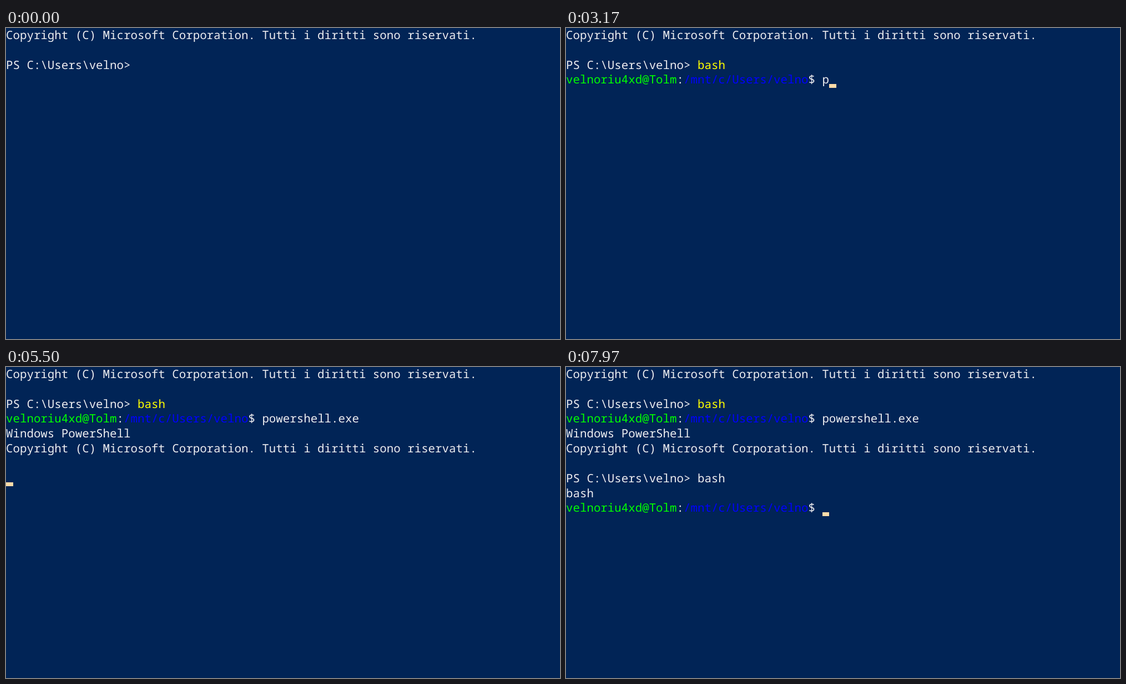
Animation, 998 px wide and 561 px high, one loop 8 s. Source, as an HTML page:

```html
<!DOCTYPE html>
<html lang="it">
<head>
<meta charset="utf-8">
<title>Terminal</title>
<style>
  html, body { margin: 0; width: 100%; height: 100%; overflow: hidden; background: #012456; }
  pre {
    margin: 0; position: absolute; left: 0; top: 0;
    font: 20.79px/26.83px "Noto Sans Mono", "DejaVu Sans Mono", monospace;
    font-variant-ligatures: none; text-rendering: geometricPrecision; color: #eeedf0;
  }
  .cmd { color: #ff0; }
  .host { color: #0f0; }
  .path { color: #00f; }
  #cursor { position: absolute; width: 12.5px; height: 7px; background: #fedba9; }
</style>
</head>
<body>
<pre id="screen"></pre>
<div id="cursor"></div>
<script>
const LOOP = 8000, CELL_W = 12.475, CELL_H = 26.83, CURSOR_ON = 1500;
const screen = document.getElementById('screen');
const cursor = document.getElementById('cursor');

const span = (cls, text) => `<span class="${cls}">${text}</span>`;
const rights = 'Copyright (C) Microsoft Corporation. Tutti i diritti sono riservati.\n\n';
const psPrompt = 'PS C:\\Users\\velno&gt; ';
const bashPrompt = span('host', 'velnoriu4xd@Tolm') + ':' + span('path', '/mnt/c/Users/velno') + '$ ';

// One key per start time
const type = (text, times, cls) =>
  times.map((time, i) => [time, cls ? span(cls, text[i]) : text[i]]);

// Everything is appended to the screen; the cursor follows the end
const steps = [
  [0, rights + psPrompt],
  ...type('bash', [1500, 1670, 1830, 1970], 'cmd'),
  [2170, '\n'],
  [2530, bashPrompt],
  ...type('powershell.exe', [3070, 3230, 3400, 3600, 3870, 4130, 4270, 4400,
    4530, 4670, 4830, 4970, 5070, 5200]),
  [5300, '\n'],
  [5430, 'Windows PowerShell\n' + rights],
  [5770, psPrompt],
  ...type('bash', [6300, 6430, 6570, 6830]),
  [7270, '\n'],
  [7400, 'bash\n'],
  [7830, bashPrompt],
];

let shown = 0;
function draw(now) {
  const t = now % LOOP;
  const done = steps.filter(([time]) => time <= t);
  if (done.length !== shown) {
    shown = done.length;
    screen.innerHTML = done.map(([, html]) => html).join('');
    const lines = screen.textContent.split('\n');
    cursor.style.left = lines.at(-1).length * CELL_W + 'px';
    cursor.style.top = lines.length * CELL_H - 6.8 + 'px';
    cursor.hidden = t < CURSOR_ON;
  }
  requestAnimationFrame(draw);
}
draw(performance.now());
</script>
</body>
</html>
```
